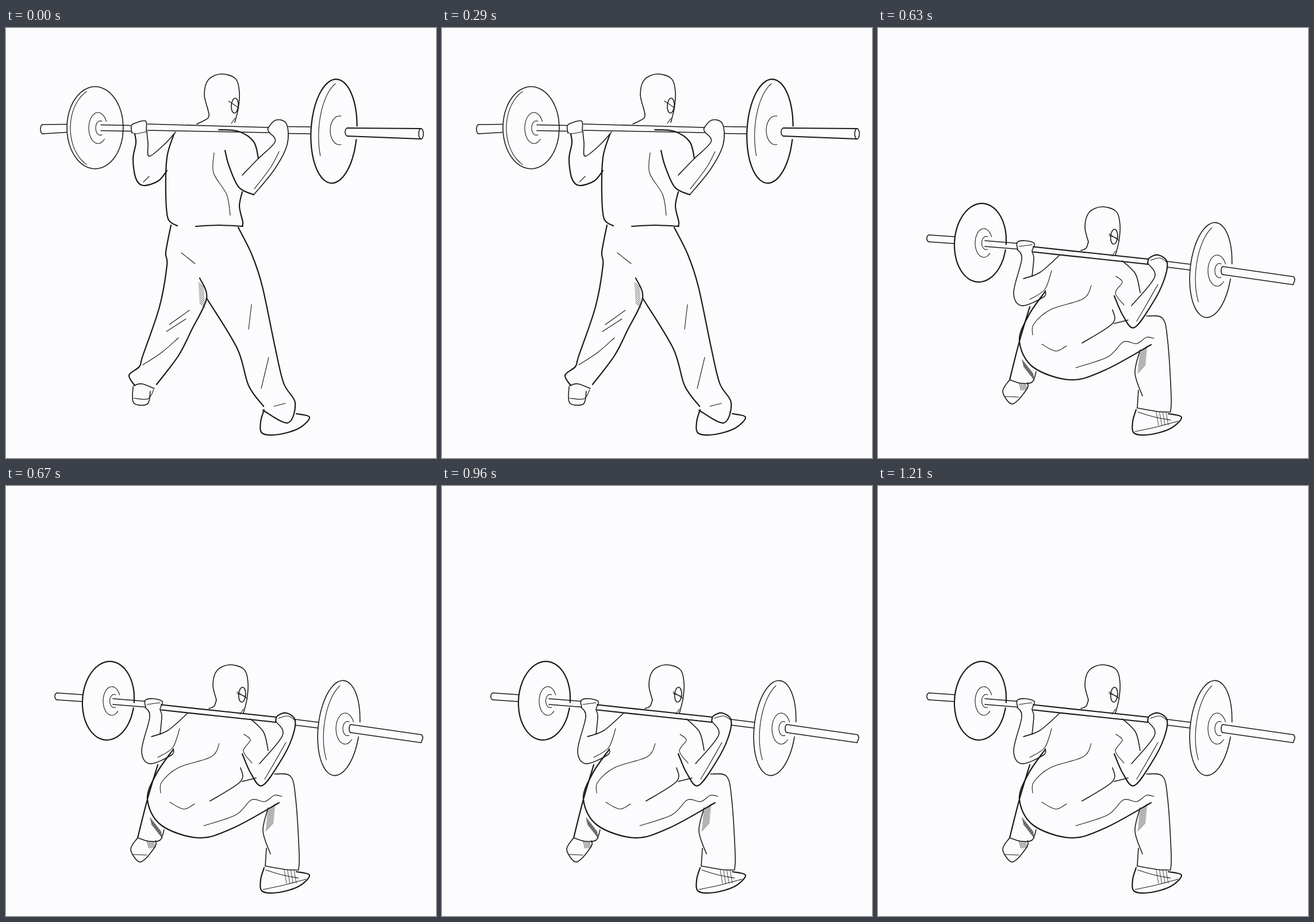
These frames come from a looping animation (748 by 748 pixels, 1250 ms). An HTML page:

```html
<!DOCTYPE html>
<html lang="en">
<head>
<meta charset="utf-8">
<title>Barbell squat</title>
<style>
  html, body { margin: 0; width: 100%; height: 100%; overflow: hidden; background: #fcfcfe; }
  svg { display: block; width: 100%; height: 100%; }
  path { fill: none; stroke: #1b1b1a; stroke-linecap: round; stroke-linejoin: round; }
</style>
</head>
<body>
<svg id="stage" viewBox="0 0 748 748"></svg>
<script>
const NS = 'http://www.w3.org/2000/svg';
const FINE = 1.1, MID = 1.6, BOLD = 2.2;
const LOOP = 1250, SWITCH = 630;
const stage = document.getElementById('stage');
let layer;

function add(parent, tag, attrs = {}) {
  const el = document.createElementNS(NS, tag);
  for (const key in attrs) el.setAttribute(key, attrs[key]);
  return parent.appendChild(el);
}

const mix = (a, b, t) => a + (b - a) * t;

// Smooth stroke through a few key points (Catmull-Rom).
function curve(width, p) {
  const at = i => p[Math.max(0, Math.min(p.length - 1, i))];
  let d = 'M' + p[0];
  for (let i = 0; i < p.length - 1; i++) {
    const [a, b, c, e] = [at(i - 1), at(i), at(i + 1), at(i + 2)];
    const c1 = b.map((v, k) => v + (c[k] - a[k]) / 6);
    const c2 = c.map((v, k) => v - (e[k] - b[k]) / 6);
    d += `C${c1} ${c2} ${c}`;
  }
  add(layer, 'path', { d, 'stroke-width': width });
}

function ink(width, text, dx = 0, dy = 0) {
  curve(width, text.split(' ').map(s => {
    const [x, y] = s.split(',').map(Number);
    return [x + dx, y + dy];
  }));
}

// Part of a tilted ellipse, angles in degrees clockwise from the right.
function arc(width, cx, cy, rx, ry, from = 0, to = 360, tilt = 0) {
  const rad = Math.PI / 180, c = Math.cos(tilt * rad), s = Math.sin(tilt * rad);
  curve(width, Array.from({ length: 25 }, (_, i) => {
    const a = mix(from, to, i / 24) * rad, x = rx * Math.cos(a), y = ry * Math.sin(a);
    return [cx + x * c - y * s, cy + x * s + y * c];
  }));
}

// Bar section given by its centre line and half thickness at each end.
function tube(width, x1, y1, x2, y2, h1, h2 = h1) {
  for (const side of [-1, 1]) curve(width, [[x1, y1 + side * h1], [x2, y2 + side * h2]]);
}

function hub(x, y, rx, ry) {
  arc(FINE, x, y, rx, ry, 45, 335);
  arc(FINE, x + 4, y, rx * 0.5, ry * 0.46, 70, 290);
}

// Parallel diagonal strokes between two edges.
function hatch(n, x1, y1, x2, y2, dx, dy) {
  for (let i = 0; i < n; i++) {
    const x = mix(x1, x2, i / (n - 1)), y = mix(y1, y2, i / (n - 1));
    add(layer, 'path', { d: `M${x} ${y}l${dx} ${dy}`, 'stroke-width': 0.8 });
  }
}

function head(dx, dy) {
  ink(MID, '351,141 345,115 352,90 374,80 399,88 406,112 404,140 398,164', dx, dy);
  arc(MID, 398 + dx * 0.85, 135 + dy - 3 * (dy > 0), 6, 13, 0, 360, 4);
  ink(FINE, '387,127 405,139', dx, dy);
  ink(FINE, '392,166 398,157', dx, dy);
}

function shoe() {
  ink(BOLD, '449,664 443,685 446,705 475,707 510,696 528,677 505,671');
}

function pose(draw) {
  layer = add(stage, 'g');
  draw();
  return layer;
}

const stand = pose(() => {
  head(0, 0);
  ink(MID, '351,141 352,156 332,167');

  // barbell
  tube(MID, 64, 176, 105, 174.5, 8, 7);
  arc(MID, 64, 176, 4, 8, 90, 270);
  arc(MID, 155, 173.5, 49, 71.5);
  arc(FINE, 161, 174, 49, 70, 115, 245);
  hub(160, 174, 16, 27);
  tube(MID, 165, 173.5, 217, 174.5, 5);
  tube(MID, 246, 172.5, 456, 177.5, 5.5, 4.5);
  tube(MID, 491, 177.5, 529, 178, 6);
  arc(BOLD, 570.5, 179.5, 40, 90.5, 8, 353, 3);
  arc(FINE, 582, 180, 38, 88, 150, 250, 3);
  arc(FINE, 580, 178, 16, 25, 80, 280);
  tube(BOLD, 594, 181, 722, 184, 7, 9);
  arc(MID, 594, 181, 4, 7, 90, 270);
  arc(MID, 722, 184, 4, 9);

  // left arm
  ink(MID, '219,183 218,170 226,165 243,162 244,179');
  ink(FINE, '219,181 225,184 246,180');
  ink(BOLD, '224,184 226,200 221,228 226,262 239,274 265,266 280,248');
  ink(MID, '245,181 247,200 249,223 275,203 295,181');
  ink(FINE, '239,268 249,258');

  // right arm
  ink(MID, '458,182 456,174 470,160 488,167 489,203 467,246 431,290');
  ink(BOLD, '431,290 405,277 388,240 381,213');
  ink(MID, '457,181 468,198 438,228 411,256');
  ink(FINE, '475,215 460,243 432,280');
  ink(BOLD, '370,177 405,180 431,198 439,227');

  // torso
  ink(BOLD, '292,185 280,225 278,290 282,332 298,344');
  ink(FINE, '362,217 361,252 384,290 390,326');
  ink(BOLD, '411,285 406,310 412,338 410,345');
  ink(BOLD, '330,345 370,343 412,345');

  // left leg
  ink(BOLD, '287,343 278,390 280,413 267,485 238,570 232,589 214,604 224,622');
  ink(BOLD, '337,435 349,470 323,525 300,570 262,620');
  hatch(11, 335, 443, 337, 478, 9, 8);
  ink(FINE, '305,391 329,410');
  ink(FINE, '319,491 284,516');
  ink(FINE, '313,506 279,528');
  ink(FINE, '300,539 270,565 238,586');

  // right leg
  ink(BOLD, '349,470 402,557 422,622 448,658');
  ink(BOLD, '404,347 428,395 446,450 468,555 483,618 503,652 490,687 447,665');
  ink(FINE, '427,481 422,524');
  ink(FINE, '457,573 444,627');
  ink(FINE, '466,658 486,653');

  // feet
  ink(MID, '222,622 236,619 258,627');
  ink(MID, '221,624 222,652 246,654 251,632');
  ink(FINE, '222,644 247,645 257,629');
  shoe();
});

const squat = pose(() => {
  head(15, 231);
  ink(MID, '366,372 362,383 353,387');
  ink(FINE, '402,361 417,366');

  // barbell
  tube(MID, 89, 366, 133, 369, 6);
  arc(MID, 89, 366, 4, 6, 90, 270);
  arc(BOLD, 178, 373.5, 45, 68.5, 8, 360, 4);
  hub(184, 374, 15, 25);
  tube(MID, 186, 375, 242, 379.5, 5);
  tube(BOLD, 270, 385, 470, 406.5, 4.5);
  tube(MID, 503, 411, 543, 416, 5);
  arc(MID, 579, 421, 36, 83, 8, 350, 6);
  arc(FINE, 588, 422, 35, 81, 135, 245, 6);
  hub(590, 422, 16, 27);
  tube(MID, 600, 422, 722, 439.5, 7);
  arc(MID, 600, 422, 3, 7, 90, 270);
  ink(MID, '723,432.5 725,438 722,446.5');

  // left arm
  ink(MID, '243,385 242,373 256,370 272,375 268,388 271,400 268,432');
  ink(FINE, '245,380 268,377');
  ink(MID, '242,385 250,402 236,460 250,483 288,468 291,457');
  ink(MID, '253,436 282,425 316,395');
  ink(FINE, '302,422 290,455 264,472');

  // right arm
  ink(BOLD, '469,411 472,400 488,395 503,408 497,440 478,478 446,521 426,500 411,466');
  ink(MID, '470,410 481,434 441,483');
  ink(FINE, '474,404 490,400 502,407');
  ink(FINE, '487,446 463,488 450,510');
  ink(MID, '425,405 448,428 456,460');
  ink(FINE, '414,432 425,442 413,461 428,482');

  // back and seat
  ink(FINE, '371,448 357,471 300,490 271,515 269,534');
  ink(BOLD, '291,458 262,500 246,545 270,590 335,612 395,595 475,551');
  ink(MID, '408,490 408,514 355,548');
  ink(FINE, '285,550 309,562 328,553');

  // legs
  ink(BOLD, '264,485 246,545 229,612');
  ink(MID, '229,612 248,618 268,616 275,598');
  hatch(12, 251, 577, 269, 600, 3, 13);
  ink(MID, '411,514 435,508');
  ink(MID, '467,501 495,505 504,545 510,640 509,667');
  ink(FINE, '344,591 400,572 427,546 450,549 467,538 480,540');
  ink(MID, '456,560 447,600 460,640');
  ink(MID, '453,630 451,661');
  hatch(12, 455, 567, 452, 600, 13, -14);

  // feet
  ink(MID, '229,612 217,632 230,653 243,648 260,626 260,617');
  ink(FINE, '221,641 245,642');
  hatch(5, 246, 619, 256, 618, 3, 11);
  shoe();
  ink(MID, '451,661 485,667 509,668');
  ink(FINE, '447,702 480,695 522,684');
  ink(FINE, '452,668 478,676 509,682');
  hatch(4, 484, 668, 501, 668, 4, 23);
});

const offset = SWITCH / LOOP;
for (const [el, before, after] of [[stand, 1, 0], [squat, 0, 1]]) {
  el.animate([
    { opacity: before, offset: 0 },
    { opacity: before, offset },
    { opacity: after, offset },
    { opacity: after, offset: 1 }
  ], { duration: LOOP, iterations: Infinity });
}
</script>
</body>
</html>
```
